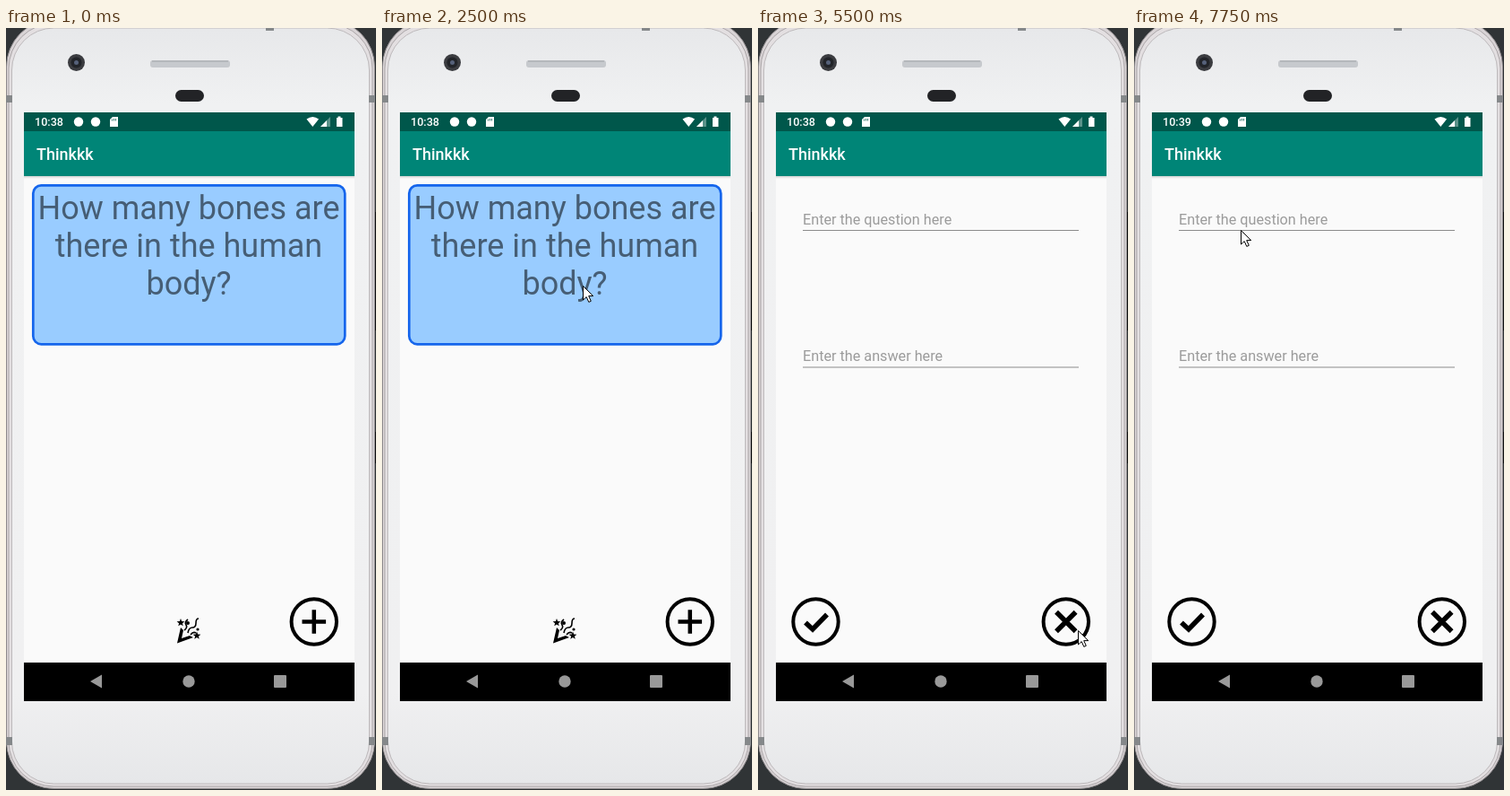
Animation, 413 px wide and 849 px high, one loop 8000 ms. Source, as an HTML page:

```html
<!DOCTYPE html>
<html lang="en">
<head>
<meta charset="utf-8">
<title>Flashcards</title>
<style>
  html, body { margin: 0; width: 100%; height: 100%; overflow: hidden; background: #303436; }
  svg { display: block; width: 413px; height: 849px; font-family: Roboto, sans-serif; }
  .card { font-size: 36px; fill: rgba(0, 0, 0, .54); text-anchor: middle; }
  .hint { font-size: 16.2px; fill: rgba(0, 0, 0, .38); }
  .title { font-size: 18px; font-weight: 500; fill: #fff; }
  .clock { font-size: 12.6px; font-weight: 500; fill: #fff; }
</style>
</head>
<body>
<svg viewBox="0 0 413 849">
  <defs>
    <linearGradient id="shell" x2="0" y2="1">
      <stop offset="0" stop-color="#e7e8ea"/>
      <stop offset=".1" stop-color="#f0f1f2"/>
      <stop offset=".88" stop-color="#f0f0f1"/>
      <stop offset="1" stop-color="#e6e7e9"/>
    </linearGradient>
    <linearGradient id="shade" x2="0" y2="1">
      <stop offset="0" stop-opacity=".16"/>
      <stop offset="1" stop-opacity="0"/>
    </linearGradient>
    <clipPath id="screen"><rect x="20" y="94" width="369" height="656"/></clipPath>
    <clipPath id="reveal"><rect id="revealBox" x="20" y="94" width="369" height="656"/></clipPath>
    <g id="bars">
      <rect x="20" y="94" width="369" height="613" fill="#fafafa"/>
      <rect x="20" y="165" width="369" height="3" fill="url(#shade)"/>
      <rect x="20" y="94" width="369" height="21" fill="#00574b"/>
      <rect x="20" y="115" width="369" height="50" fill="#008577"/>
      <text class="title" x="34" y="147">Thinkkk</text>
    </g>
    <circle id="ring" r="25.2" fill="none" stroke="#000" stroke-width="4"/>
    <path id="star" d="M0-4.5 1.2-1.4 4.4-1.3 1.9.7 2.7 3.8 0 2-2.7 3.8-1.9.7-4.4-1.3-1.2-1.4Z"/>
  </defs>

  <!-- phone body -->
  <rect x="411" y="205" width="2" height="132" fill="#111"/>
  <rect x="411" y="450" width="2" height="35" fill="#111"/>
  <rect x=".5" y="-9.5" width="411" height="857" rx="53" fill="#d9d4d6" stroke="#8d898b"/>
  <rect x="3" y="-5" width="406" height="850" rx="50" fill="#e3dfe1" stroke="#aaa5a7"/>
  <rect x="6.5" y="0" width="399" height="842" rx="47" fill="url(#shell)" stroke="#bdb9bb"/>
  <g fill="#85888a">
    <path d="M0 75h7v8H0zM405 75h7v8h-7zM0 790h7v9H0zM405 790h7v9h-7z"/>
    <rect x="290" y="0" width="9" height="3"/>
  </g>
  <circle cx="78.5" cy="38.5" r="9.5" fill="#3b3c40"/>
  <circle cx="78.5" cy="38.5" r="6" fill="#222429"/>
  <circle cx="78.5" cy="38.5" r="2.5" fill="#56617a"/>
  <rect x="161" y="36" width="89" height="8" rx="3" fill="#c6c9cd"/>
  <path d="M163 37h85" stroke="#a3a6aa"/>
  <rect x="189" y="69" width="32" height="13" rx="6.5" fill="#222326"/>

  <g clip-path="url(#screen)">
    <rect x="20" y="94" width="369" height="656" fill="#000"/>
    <g fill="#999">
      <path d="M94 728 107 720.5v15z"/>
      <circle cx="204" cy="728" r="6.7"/>
      <rect x="299" y="721" width="14" height="14" rx="1"/>
    </g>

    <g id="home">
      <use href="#bars"/>
      <g id="question">
        <rect x="30.3" y="175.3" width="348" height="177" rx="9" fill="#9cf" stroke="#1565ec" stroke-width="2.7"/>
        <g class="card">
          <text x="204" y="212.5">How many bones are</text>
          <text x="204" y="254.7">there in the human</text>
          <text x="204" y="296.9">body?</text>
        </g>
      </g>
      <g id="answer">
        <rect x="31.6" y="176.6" width="345" height="174.5" rx="8" fill="#cfc" stroke="#2ca44c" stroke-width="5"/>
        <text class="card" x="204" y="212.5">206</text>
      </g>
      <g>
        <path d="M191 685.5 195 668l3 3-2 9 9-3 4 2z"/>
        <path d="M199 671q4-3 2-6t2-6M203 674q1-6 5-6t4-5 3-5M206 676q3-4 6-2" fill="none" stroke="#000" stroke-width="1.6"/>
        <use href="#star" x="195" y="662.5"/>
        <use href="#star" x="213" y="677"/>
        <circle cx="203" cy="663" r="2"/>
        <circle cx="214" cy="670" r="1.6"/>
      </g>
      <use href="#ring" x="343.8" y="661.5"/>
      <path d="M330.5 661.5h26.6M343.8 648.2v26.6" stroke="#000" stroke-width="4.5"/>
    </g>
    <rect id="dim" x="20" y="94" width="369" height="613" fill-opacity=".1"/>

    <g clip-path="url(#reveal)">
      <g id="form">
        <use href="#bars"/>
        <text class="hint" x="50" y="218.5">Enter the question here</text>
        <text class="hint" x="50" y="371">Enter the answer here</text>
        <path d="M50 225.5h308M50 378h308" stroke="#8b8b8b"/>
        <use href="#ring" x="64.5" y="661.5"/>
        <path d="M53 662.5 61 670 77 653.5" fill="none" stroke="#000" stroke-width="5.5"/>
        <use href="#ring" x="343.8" y="661.5"/>
        <path d="M333 650.7 354.6 672.3M354.6 650.7 333 672.3" stroke="#000" stroke-width="5.5"/>
      </g>
    </g>

    <g fill="#fff">
      <text id="clock" class="clock" x="32" y="109.3"></text>
      <circle cx="81" cy="104.5" r="5.2"/>
      <circle cx="100" cy="104.5" r="5.2"/>
      <path d="M119 99h6v11h-9v-8z"/>
      <path d="M118.5 101.5v2M120.5 101v2.5M122.5 101v2.5" stroke="#00574b" stroke-width=".8"/>
      <path d="M335.5 101.5q6.800-5 13.600 0L342.300 110z"/>
      <path d="M362 99v11h-11z" fill-opacity=".35"/>
      <path d="M358 103v7h-7z"/>
      <path d="M369 100h1.500v-1.500h3V100H375.500v10H369z"/>
    </g>
  </g>

  <path id="cursor" d="M.5.5v15.500l3.700-3.400 2.600 5.800 2.500-1.100-2.600-5.700h5z" fill="#fff" stroke="#000"/>
</svg>
<script>
  const LOOP = 8000;
  const byId = id => document.getElementById(id);
  const [home, question, answer, dim, form, revealBox, clock, cursor] =
    ["home", "question", "answer", "dim", "form", "revealBox", "clock", "cursor"].map(byId);

  const pointer = [
    [500, 158, 664], [750, 211, 331], [1000, 210, 270], [2500, 224, 287],
    [2750, 253, 661], [3000, 238, 661], [3250, 338, 671], [3500, 337, 664],
    [4750, 149, 224], [5000, 277, 381], [5250, 351, 635], [5500, 357, 671],
    [6250, 356, 686], [6500, 330, 667], [6750, 340, 664],
    [7500, 196, 446], [7750, 119, 225]
  ];

  // Form window: [time, visible, downward offset, top of the revealed area]
  const formSteps = [
    [0, false, 0, 94], [4250, true, 17.7, 220], [4500, true, 4, 98], [4750, true, 0, 94],
    [6000, true, 17.7, 220], [6250, false, 0, 94], [7250, true, 12, 146], [7500, true, 0, 94]
  ];

  const stepAt = (steps, t) => steps.findLast(step => step[0] <= t);
  const show = (node, on) => node.setAttribute("display", on ? "inline" : "none");
  const move = (node, x, y) => node.setAttribute("transform", `translate(${x} ${y})`);

  function render(t) {
    const flipped = t >= 1750 && t < 2500;
    show(question, !flipped);
    show(answer, flipped);

    const [, visible, offset, top] = stepAt(formSteps, t);
    const sliding = visible && offset > 0;
    show(form, visible);
    show(dim, sliding);
    move(form, 0, offset);
    move(home, 0, sliding ? -4.5 : 0);
    revealBox.setAttribute("y", top);

    clock.textContent = t < 7750 ? "10:38" : "10:39";

    const spot = stepAt(pointer, t);
    show(cursor, spot);
    if (spot) move(cursor, spot[1], spot[2]);
  }

  const start = performance.now();
  function tick() {
    render((performance.now() - start) % LOOP);
    requestAnimationFrame(tick);
  }
  render(0);
  requestAnimationFrame(tick);
</script>
</body>
</html>
```
